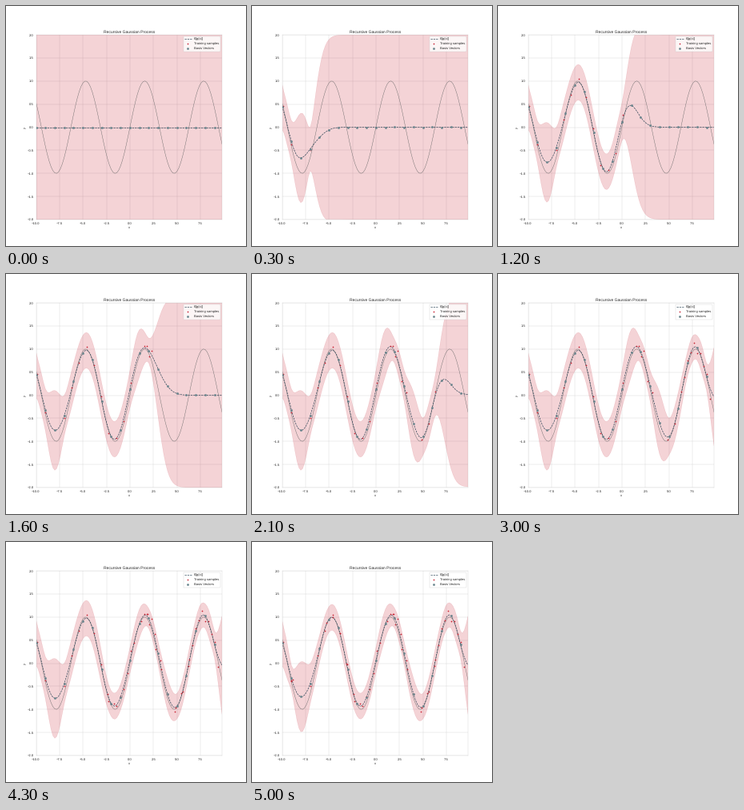
A matplotlib script for the animation above (5.1 s loop, 300 by 300 pixels).

```python
import numpy as np
import matplotlib.pyplot as plt
from matplotlib.animation import FuncAnimation

FRAMES, INTERVAL = 51, 100
LENGTH, NOISE = 1.12, 0.24
INK, RED, NAVY, TEAL = "0.15", "#c82333", "#1f3a4d", "#66838b"

plt.rcParams.update({
    "font.family": "Liberation Sans", "text.hinting": "none",
    "text.color": INK, "axes.labelcolor": INK,
    "xtick.color": INK, "ytick.color": INK,
    "axes.edgecolor": "0.8", "grid.color": "0.8", "axes.axisbelow": True,
    "xtick.major.size": 0, "ytick.major.size": 0,
    "xtick.major.pad": 7, "ytick.major.pad": 7,
})

# The sampler sweeps to the right, then back, skipping a few gaps.
SWEEP = [(1, -9.9), (2, -9.0), (3, -7.0), (12, 0.1), (13, 1.5), (16, 2.3),
         (18, 3.2), (19, 4.9), (21, 6.35), (30, 9.4), (31, 6.2),
         (48, -6.0), (49, -8.85), (50, -9.0)]


def take_samples():
    rng = np.random.default_rng(4)
    x = np.interp(np.arange(1, FRAMES), *zip(*SWEEP))
    return np.column_stack([x, np.sin(x) + rng.normal(0.05, 0.07, len(x))])


def kernel(a, b):
    return np.exp(-0.5 * ((a[:, None] - b[None, :]) / LENGTH) ** 2)


samples = take_samples()
grid = np.linspace(-10, 9.8, 100)
basis = np.arange(-10.0, 10.0)
prior = kernel(basis, basis)
inverse = np.linalg.inv(prior + 1e-8 * np.eye(len(basis)))


def project(x, mean, cov):
    """Carry the belief at the basis vectors over to the points x."""
    k = kernel(x, basis)
    gain = k @ inverse
    var = 1 - np.sum(gain * k, axis=1) + np.sum((gain @ cov) * gain, axis=1)
    return gain, gain @ mean, np.maximum(var, 0)


def learn():
    mean, cov = np.zeros(len(basis)), prior.copy()
    states = [(mean, cov)]
    for x, y in samples:
        gain, guess, var = project(np.array([x]), mean, cov)
        step = (cov @ gain.T)[:, 0] / (var[0] + NOISE ** 2)
        mean = mean + step * (y - guess[0])
        cov = cov - np.outer(step, gain[0] @ cov)
        states.append((mean, cov))
    return states


states = learn()

fig, ax = plt.subplots(figsize=(10, 10), dpi=30)
ax.set(xlim=(grid[0], grid[-1]), ylim=(-2, 2), xlabel="x", ylabel="y",
       title="Recursive Gaussian Process")
ax.grid(True)

band, = ax.fill([-10, 0, 9.8], [0, 0, 0], color=RED, alpha=0.2, lw=1)
ax.plot(grid, np.sin(grid), color="0.4", lw=1)
curve, = ax.plot([], [], "--", color=NAVY, lw=1.5, label="E[g(x)]")
dots = ax.scatter([], [], s=30, marker="+", color=RED, zorder=3,
                  label="Training samples")
nodes = ax.scatter([], [], s=30, marker="o", color=TEAL, zorder=4,
                   label="Basis Vectors")
ax.legend(loc="upper right", frameon=True)


def draw(i):
    mean, cov = states[i]
    _, mid, var = project(grid, mean, cov)
    reach = 2 * np.sqrt(var)
    band.set_xy(np.column_stack([
        np.concatenate([grid, grid[::-1]]),
        np.concatenate([mid + reach, (mid - reach)[::-1]]),
    ]))
    curve.set_data(grid, mid)
    dots.set_offsets(samples[:i])
    nodes.set_offsets(np.column_stack([basis, mean]))
    return band, curve, dots, nodes


anim = FuncAnimation(fig, draw, frames=FRAMES, interval=INTERVAL,
                     repeat=True, repeat_delay=0)
plt.show()
```
